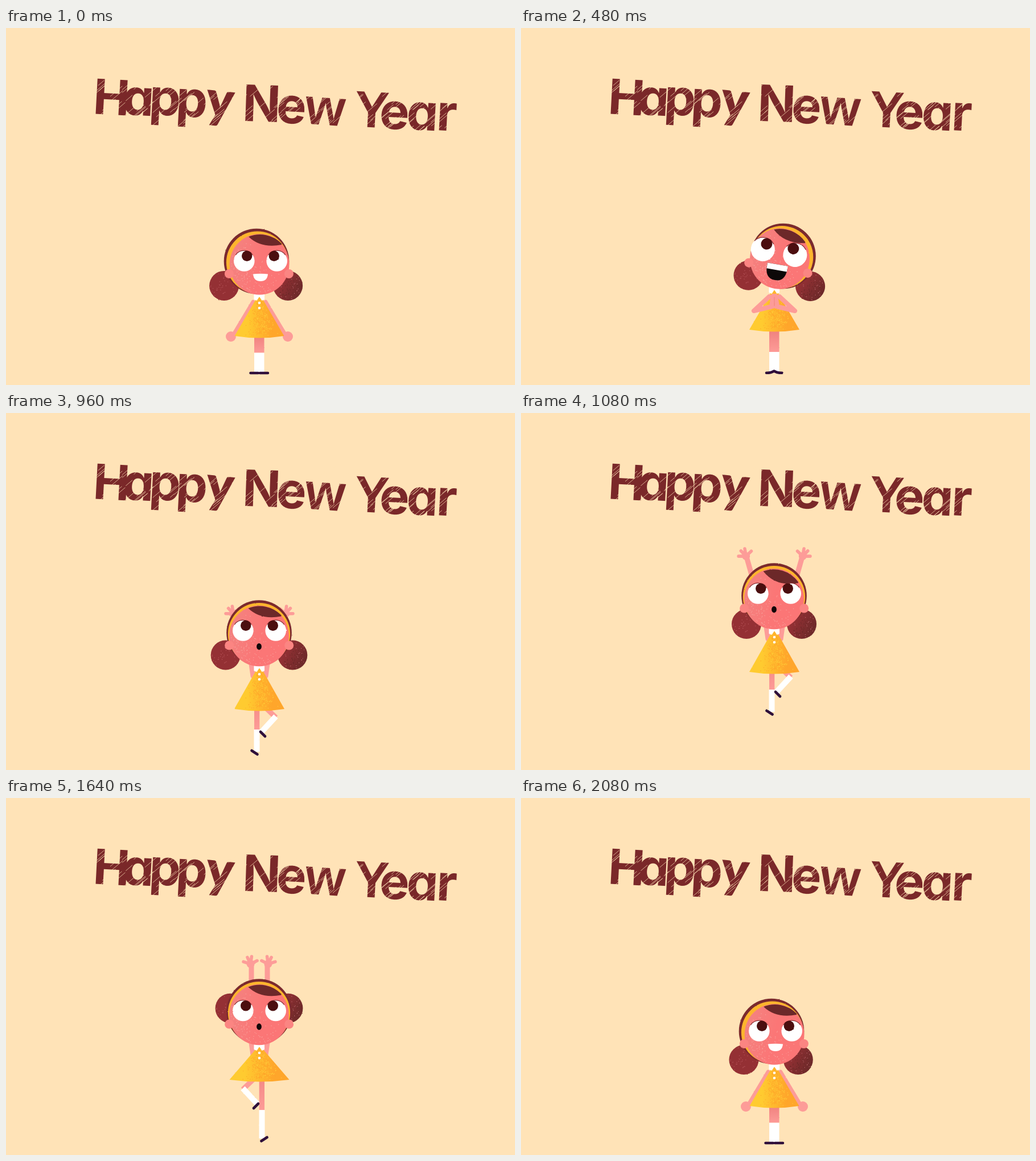
Animation of 894x626 px, one loop 2120 ms. Source, as an HTML page:

```html
<!DOCTYPE html>
<html lang="en">
<head>
<meta charset="utf-8">
<title>Happy New Year</title>
<style>
html, body { margin: 0; width: 100%; height: 100%; overflow: hidden; background: #ffe3b7; }
svg { display: block; width: 894px; height: 626px; }
#title { font: 700 88px Inter, "Open Sans", sans-serif; font-feature-settings: "cv11"; fill: #7a2829; text-anchor: middle; }
#title .narrow { font: 700 90px "Liberation Sans", Arial, sans-serif; }
#title .straight { font: 900 90px Lato, sans-serif; }
</style>
</head>
<body>
<svg viewBox="0 0 894 626">
  <defs>
    <linearGradient id="skirt"><stop offset=".25" stop-color="#ffcb30"/><stop offset=".75" stop-color="#ffa62b"/></linearGradient>
    <linearGradient id="face" x2="1" y2=".25"><stop offset="0" stop-color="#f28582"/><stop offset=".6" stop-color="#fb7676"/></linearGradient>
    <linearGradient id="leg" x2="0" y2="1"><stop offset="0" stop-color="#ee7f7c"/><stop offset="1" stop-color="#fd9b97"/></linearGradient>
    <linearGradient id="bun" x2="1" y2=".5"><stop offset=".3" stop-color="#943034"/><stop offset="1" stop-color="#6f2a2a"/></linearGradient>
    <filter id="rough" filterUnits="userSpaceOnUse" x="330" y="200" width="230" height="426" color-interpolation-filters="sRGB">
      <feTurbulence type="fractalNoise" baseFrequency=".25" numOctaves="2" seed="4"/>
      <feDisplacementMap in="SourceGraphic" scale="1.6" xChannelSelector="R" yChannelSelector="G"/>
    </filter>
  </defs>
  <g id="title"></g>
  <path id="scratches" fill="none" stroke="#ffe3b7" stroke-width=".9" opacity=".8"/>
  <g id="girl" filter="url(#rough)"></g>
</svg>
<script>
const LOOP = 2120, STEP = 40, MID = 445;
const LIMB = '#fd9c98', HAIR = '#7b2a2e', BAND = '#fdb52d', SHOE = '#2f0f3a';
const $ = id => document.getElementById(id);

let seed = 7;
const rnd = () => (seed = (seed * 16807) % 2147483647) / 2147483647;

// Lettering: glyph, centre x, baseline, tilt, style
$('title').innerHTML = [
  ['H', 184, 152, 3, 'narrow'], ['a', 231, 153, 3], ['p', 278, 153, 3], ['p', 325, 156, 3], ['y', 373, 157, 6, 'straight'],
  ['N', 448, 164, 2], ['e', 500, 167, 3], ['w', 559, 170, 4, 'narrow'],
  ['Y', 641, 174, 3, 'narrow'], ['e', 681, 177, 3], ['a', 730, 179, 3], ['r', 773, 180, 3]
].map(([c, x, y, a, style = '']) =>
  `<text class="${style}" transform="translate(${x} ${y}) rotate(${a})">${c}</text>`).join('');

let scratches = '';
for (let i = 0; i < 230; i++) {
  const x = 155 + rnd() * 630, len = 6 + rnd() * 20;
  scratches += `M${x},${95 + (x - 155) * .04 + rnd() * 75}l${len},${-len * .85}`;
}
$('scratches').setAttribute('d', scratches);

// Grain made of tiny round dots; place() returns a point or null
function grain(n, color, place) {
  let d = '';
  for (let i = 0; i < n; i++) {
    const p = place();
    if (p) d += `M${p[0].toFixed(1)},${p[1].toFixed(1)}h.1`;
  }
  return `<path d="${d}" stroke="${color}" stroke-width="1.3" stroke-linecap="round" fill="none"/>`;
}
function inDisc(r, chance) {
  const a = rnd() * 2 * Math.PI, q = Math.sqrt(rnd()) * r;
  const x = q * Math.cos(a), y = q * Math.sin(a);
  return rnd() < chance(x / r, y / r) ? [x, y] : null;
}
function inSkirt(chance) {
  const v = Math.sqrt(rnd()), u = rnd() * 2 - 1;
  return rnd() < chance(u * v) ? [u * v * 41, 6 + v * 65] : null;
}
const skirtGrain = grain(450, '#ffa328', () => inSkirt(x => Math.exp(-((x - .05) ** 2) * 9))) +
  grain(220, '#ffd03a', () => inSkirt(x => Math.exp(-((x - .3) ** 2) * 12)));
const faceGrain = grain(600, '#f8a39d', () => inDisc(50, (x, y) => Math.max(0, .35 - x * .6 + y * .45) * .6));
const bunGrain = [
  grain(50, '#b9565b', () => inDisc(24, () => .8)),
  grain(170, '#662725', () => inDisc(24, (x, y) => .4 + x * .4 + y * .4)) + grain(40, '#b9656a', () => inDisc(24, () => .7))
];

const line = (d, color, w, cap = 'round') =>
  `<path d="${d}" fill="none" stroke="${color}" stroke-width="${w}" stroke-linecap="${cap}" stroke-linejoin="round"/>`;
const shape = (d, color) => `<path d="${d}" fill="${color}"/>`;
const oval = (x, y, rx, color, ry = rx) => `<ellipse cx="${x}" cy="${y}" rx="${rx}" ry="${ry}" fill="${color}"/>`;
const group = (transform, content) => `<g transform="${transform}">${content}</g>`;
const flipped = content => group(`translate(${2 * MID} 0) scale(-1 1)`, content);
const mirrored = content => content + flipped(content);
const wave = (t, peak, period) => Math.cos(2 * Math.PI * (t - peak) / period);
const easeOut = k => 1 - (1 - Math.min(1, Math.max(0, k))) ** 3;

function tween(keys, t) {
  let i = 1;
  while (i < keys.length - 1 && keys[i][0] < t) i++;
  const a = keys[i - 1], b = keys[i];
  const k = Math.min(1, Math.max(0, (t - a[0]) / (b[0] - a[0])));
  return a.map((v, j) => v + (b[j] - v) * k);
}

// time, body, skirt half width, skirt drop, hand x, hand lift, foot, knee, bun angle, gaze
const JUMP = [
  [960, 445, 44, 77, 46, -95, 70, 70, 58, 0],
  [1000, 415, 42, 78, 52, -125, 42, 42, 42, 0],
  [1080, 380, 44, 77, 50, -131, 0, 0, 33, 0],
  [1180, 372.5, 45.5, 75, 47, -133, -7, -7, 40, -1],
  [1300, 368.5, 48, 73, 43, -134.5, -11, -11, 47, -2],
  [1400, 373, 51.5, 69, 40, -135, -6, -6, 53, -2.5],
  [1520, 400, 52, 66, 28, -140, 30, 20, 95, 0],
  [1640, 434, 52.5, 63, 15, -145, 73, 47, 142, 2.5]
];

function pose(t) {
  if (t >= 240 && t < 960) {
    const enter = easeOut((t - 200) / 200), crouch = Math.max(0, (t - 840) / 80);
    const body = 469 - 12 * enter - (t > 480 ? Math.min(1, (t - 480) / 320) : 0) + crouch * 7;
    return { kind: 'clasp', body, half: 44, drop: 75, headX: 450 + 7 * enter, headY: body - 54 - Math.min(1, t / 800),
      tilt: 10 * enter, look: -5.5, gaze: 0, hair: 3, bun: 57 + 16 * wave(t, 640, 460) };
  }
  if (t >= 960 && t < 1680) {
    const [, body, half, drop, handX, lift, foot, knee, bun, gaze] = tween(JUMP, t);
    return { kind: 'jump', body, half, drop, handX, handY: body + lift, foot, knee, bun, gaze, swap: t >= 1520,
      headX: 444.5, headY: body - 56.5, tilt: 0, look: .5, hair: 0 };
  }
  const settle = t >= 1680 ? 6 * Math.max(0, 1 - (t - 1680) / 160) : 0;
  return { kind: 'stand', body: 469 + settle, half: 43.5, drop: 74 - settle * .5, headX: 443, headY: 412 + settle,
    tilt: 0, look: 4, gaze: 0, hair: -3, bun: 42 + 22 * wave(t, 88, 460) };
}

function legs(p) {
  if (p.kind !== 'jump') {
    const clasp = p.kind === 'clasp', top = p.body + p.drop - 6, sock = clasp ? 568 : 569.5;
    return `<rect x="436" y="${top}" width="17.5" height="${sock - top}" fill="url(#leg)"/>` +
      shape(`M436,${sock}h17.5V603h-17.5Z`, '#fff') +
      line(clasp ? 'M431,604.8Q439,605 444.5,601.5Q450,605 458.5,604.8' : 'M429.5,605H443M446,605H460', SHOE, 4.5);
  }
  const ankle = 524 + p.foot, sock = ankle - 39 - (p.foot - p.knee) * .42, top = p.body + 25;
  const leg = `<rect x="436" y="${top}" width="9.3" height="${sock - top}" fill="url(#leg)"/>` +
    shape(`M435.5,${sock}h10V${ankle}h-10Z`, '#fff') +
    line(`M431.5,${ankle - 2}l10,6.5`, SHOE, 4.6) +
    group(`translate(0 ${p.knee})`,
      line('M450,441L474,464', LIMB, 9, 'butt') +
      line('M474,462L449,489', '#fff', 10, 'butt') +
      line('M447,489l8,8', SHOE, 4.6));
  return p.swap ? flipped(leg) : leg;
}

function armsBehind(p) {
  const y = p.body;
  if (p.kind === 'stand')
    return mirrored(line(`M434,${y + 11}L401,${y + p.drop - 8}`, LIMB, 6.5) + oval(395, y + 72, 9, LIMB));
  if (p.kind === 'clasp') return '';
  const x = MID - p.handX;
  const fingers = 'M0,2L-13,1M0,2L-8,-8M0,2L-1,-11M0,2L10,-6';
  return mirrored(line(`M434,${y + 16}L431,${y - 5}L${x + 1},${p.handY + 3}`, LIMB, 9) +
    group(`translate(${x} ${p.handY}) rotate(${(40 - p.handX) * .5})`, line(fingers, LIMB, 5.6) + oval(0, 2, 7, LIMB)));
}

function armsFront(p) {
  if (p.kind !== 'clasp') return '';
  return group(`translate(0 ${p.body - 457})`, mirrored(
    line('M436,471L409,496L442,488', LIMB, 8) + line('M440,488L443,470', LIMB, 8)) +
    line('M445,472V487', '#f0837f', 1));
}

function dress(p) {
  const y = p.body, bottom = y + p.drop, l = MID - p.half, r = MID + p.half;
  return shape(`M440,${y + 5}Q445,${y + 1} 450,${y + 5}L${r},${bottom - 3}Q445,${bottom + 4} ${l},${bottom - 3}Z`, 'url(#skirt)') +
    group(`translate(${MID} ${y}) scale(${p.half / 44} ${p.drop / 75})`, skirtGrain) +
    shape(`M435.5,${y - 3}h18.5v10l-4.5,2-4.5-7-4.5,7-5-2Z`, '#fff') +
    (p.kind === 'clasp' ? '' : oval(MID, y + 13, 2.3, '#fff') + oval(MID, y + 22, 2.3, '#fff'));
}

function mouth(p) {
  if (p.kind === 'stand') return shape('M-9,19.5Q4,18 17,19.5Q16,32 4,32Q-8,32 -9,19.5Z', '#fff');
  if (p.kind === 'jump') return oval(0, 21 + p.gaze, 4.4, '#120608', 5.8);
  return shape('M-22,13H14Q16,41 -4,41Q-24,41 -22,13Z', '#0d0808') + shape('M-22,13H14.3L14,23H-22Z', '#fff');
}

function head(p) {
  const clasp = p.kind === 'clasp', r = clasp ? 21 : 18.3;
  const eyeY = { stand: -3.5, clasp: -8.5, jump: -7 }[p.kind] + p.gaze;
  const eye = side => {
    const x = side * 28.7 + p.look, px = side * 23.8 + p.look;
    return oval(x, eyeY, r, '#fff') +
      line(`M${x - r * .8},${eyeY - r * .6}A${r} ${r} 0 0 1 ${x + r * .8},${eyeY - r * .6}`, '#8c3034', 1.3) +
      oval(px, eyeY - (clasp ? 10.5 : 8.8), clasp ? 10 : 9.2, '#4b0e0f');
  };
  const angle = p.bun * Math.PI / 180;
  const bun = side => group(
    `translate(${side * (30 + 34 * Math.sin(angle)) + p.hair * 1.3} ${18 + 34 * Math.cos(angle)})`,
    oval(0, 0, 26, side < 0 ? '#943034' : 'url(#bun)') + bunGrain[side < 0 ? 0 : 1]);
  const ear = side => oval(side * 52.5 + p.look * .35, 19, 8, '#fb8582');
  const fx = -p.hair * .7;
  // The fringe hangs lower while the hair trails behind a rising head
  const droop = p.kind === 'jump' ? Math.min(7, Math.max(0, (48 - p.bun) * .45)) : 0;
  const fringe = shape(`M-18,-46Q4,${-25 + droop} ${40 + droop * .5},${-32 + droop}L${40 + droop * .5},${-34 + droop}A53 53 0 0 0 -18,-46Z`, '#6c2829');
  const content = bun(-1) + bun(1) +
    oval(p.hair, -3, 57.3, HAIR) + oval(p.hair * .5, -1, 54.6, BAND) +
    oval(fx, 2.5, 52.4, 'url(#face)', 53.3) + group(`translate(${fx} 2.5)`, faceGrain) +
    group(`translate(${fx - 1} 0)`, fringe) +
    ear(-1) + ear(1) + eye(-1) + eye(1) + mouth(p);
  return group(`translate(${p.headX} ${p.headY}) rotate(${p.tilt})`, content);
}

function draw(t) {
  const p = pose(t);
  $('girl').innerHTML = armsBehind(p) + legs(p) + dress(p) + armsFront(p) + head(p);
}

let shown = -1;
const start = performance.now();
function tick(now) {
  const t = Math.floor(Math.max(0, now - start) % LOOP / STEP) * STEP;
  if (t !== shown) draw(shown = t);
  requestAnimationFrame(tick);
}
tick(start);
</script>
</body>
</html>
```
